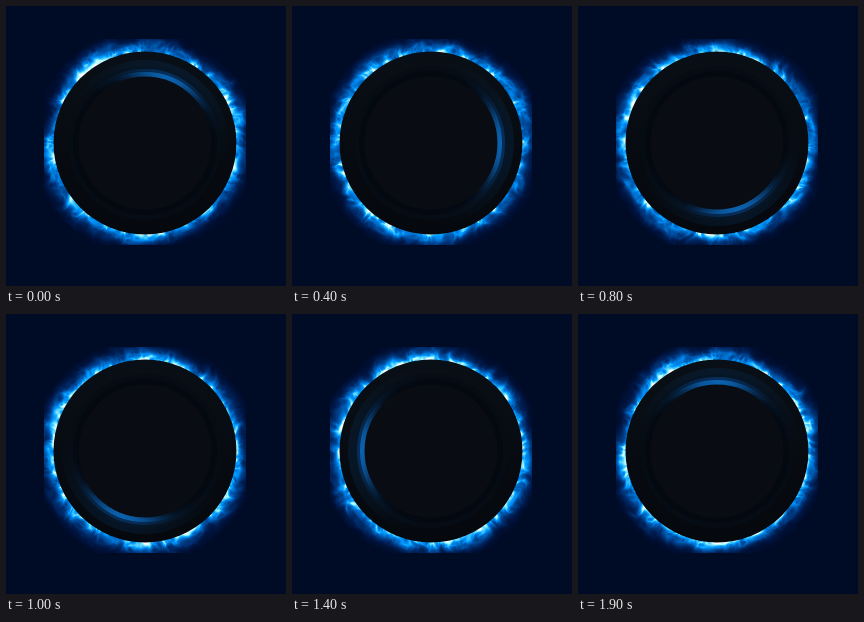
An HTML page with a canvas that plays this animation: 280x280 px, repeating every 2000 ms.

```html
<!DOCTYPE html>
<html lang="en">
<head>
<meta charset="utf-8">
<title>Blue fire ring</title>
<style>
  html, body { margin: 0; width: 100%; height: 100%; overflow: hidden; background: #000b26; }
  canvas { display: block; width: 280px; height: 280px; }
</style>
</head>
<body>
<canvas id="stage" width="280" height="280"></canvas>
<script>
const ctx = document.getElementById('stage').getContext('2d');
const TAU = Math.PI * 2, CX = 139, CY = 137, RADIUS = 91.5;
const STEPS = 20, STEP_MS = 100;
const BOX = { x: 38, y: 33, w: 202, h: 206 };

const clamp = v => Math.max(0, Math.min(1, v));
const mod = (v, n) => ((v % n) + n) % n;
const mix = (a, b, t) => a + (b - a) * t;
const smooth = t => t * t * (3 - 2 * t);

function hash(x, y, seed) {
  let h = Math.imul(x, 374761393) ^ Math.imul(y + 17, 668265263) ^ Math.imul(seed + 5, 974634777);
  h = Math.imul(h ^ (h >>> 13), 1274126177);
  h = Math.imul(h ^ (h >>> 15), 2246822519);
  return ((h ^ (h >>> 16)) >>> 0) / 4294967296;
}

// Value noise that repeats after px, py cells.
function noise(x, y, px, py, seed) {
  const ix = Math.floor(x), iy = Math.floor(y);
  const u = smooth(x - ix), v = smooth(y - iy);
  const x0 = mod(ix, px), x1 = mod(ix + 1, px);
  const y0 = mod(iy, py), y1 = mod(iy + 1, py);
  return mix(
    mix(hash(x0, y0, seed), hash(x1, y0, seed), u),
    mix(hash(x0, y1, seed), hash(x1, y1, seed), u), v);
}

// Flame strength at a turn around the ring (0..1), distance from the rim and loop time (0..1).
function flame(turn, dist, time) {
  const height = 4 + 11 * noise(turn * 22, time * 3, 22, 3, 1);
  const bend = (noise(turn * 40, dist / 12 - time * 5, 40, 5, 2) - 0.5) * 0.018;
  let strands = 0, weight = 0.5;
  for (let i = 0; i < 3; i++) {
    const f = 1 << i, cells = 44 * f, rows = 5 * f;
    const n = noise((turn + bend) * cells, dist / 15 * f - time * rows, cells, rows, 3 + i);
    strands += weight * (1 - Math.abs(2 * n - 1));
    weight *= 0.6;
  }
  const body = Math.exp(-Math.max(0, dist) / height) * clamp(1.4 - dist / 16);
  return body * (0.3 + 1.25 * strands * strands);
}

function drawFlames(time) {
  const image = ctx.getImageData(BOX.x, BOX.y, BOX.w, BOX.h), px = image.data;
  for (let y = 0; y < BOX.h; y++) {
    for (let x = 0; x < BOX.w; x++) {
      const dx = x + BOX.x + 0.5 - CX, dy = y + BOX.y + 0.5 - CY;
      const dist = Math.hypot(dx, dy) - RADIUS;
      if (dist < -2 || dist > 22) continue;
      const v = flame(Math.atan2(dy, dx) / TAU + 0.5, dist, time);
      const i = (y * BOX.w + x) * 4;
      px[i] = 255 * clamp((v - 0.68) * 2);
      px[i + 1] = 11 + 240 * Math.pow(clamp(v), 1.25);
      px[i + 2] = 38 + 217 * clamp(v * 1.55);
    }
  }
  ctx.putImageData(image, BOX.x, BOX.y);
}

function disc(radius, fill) {
  ctx.fillStyle = fill;
  ctx.beginPath();
  ctx.arc(CX, CY, radius, 0, TAU);
  ctx.fill();
}

// Ring lit around one angle, fading out over `spread` turns to each side.
function litRing(radius, width, angle, spread, rgb, alpha) {
  const g = ctx.createConicGradient(angle - Math.PI, CX, CY);
  for (let i = -4; i <= 4; i++) {
    const a = alpha * smooth(1 - Math.abs(i) / 4);
    g.addColorStop(0.5 + spread * i / 4, `rgba(${rgb},${a})`);
  }
  ctx.strokeStyle = g;
  ctx.lineWidth = width;
  ctx.beginPath();
  ctx.arc(CX, CY, radius, 0, TAU);
  ctx.stroke();
}

function drawPlate(time) {
  const angle = time * TAU + 0.33 - Math.PI / 2;
  const rim = ctx.createLinearGradient(0, CY - RADIUS, 0, CY + RADIUS);
  rim.addColorStop(0, '#090f16');
  rim.addColorStop(1, '#05080d');
  disc(RADIUS, rim);
  disc(77, '#060c14');
  disc(72, '#040911');
  litRing(76, 14, angle, 0.24, '8,48,88', 0.3);
  litRing(70, 8, angle, 0.17, '6,62,125', 0.6);
  litRing(68.5, 5, angle, 0.125, '12,108,190', 0.85);
  disc(66.5, '#090d13');
}

let shown = -1;
function frame() {
  const step = Math.floor(performance.now() / STEP_MS) % STEPS;
  if (step !== shown) {
    shown = step;
    ctx.fillStyle = '#000b26';
    ctx.fillRect(0, 0, 280, 280);
    drawFlames(step / STEPS);
    drawPlate(step / STEPS);
  }
  requestAnimationFrame(frame);
}
frame();
</script>
</body>
</html>
```
